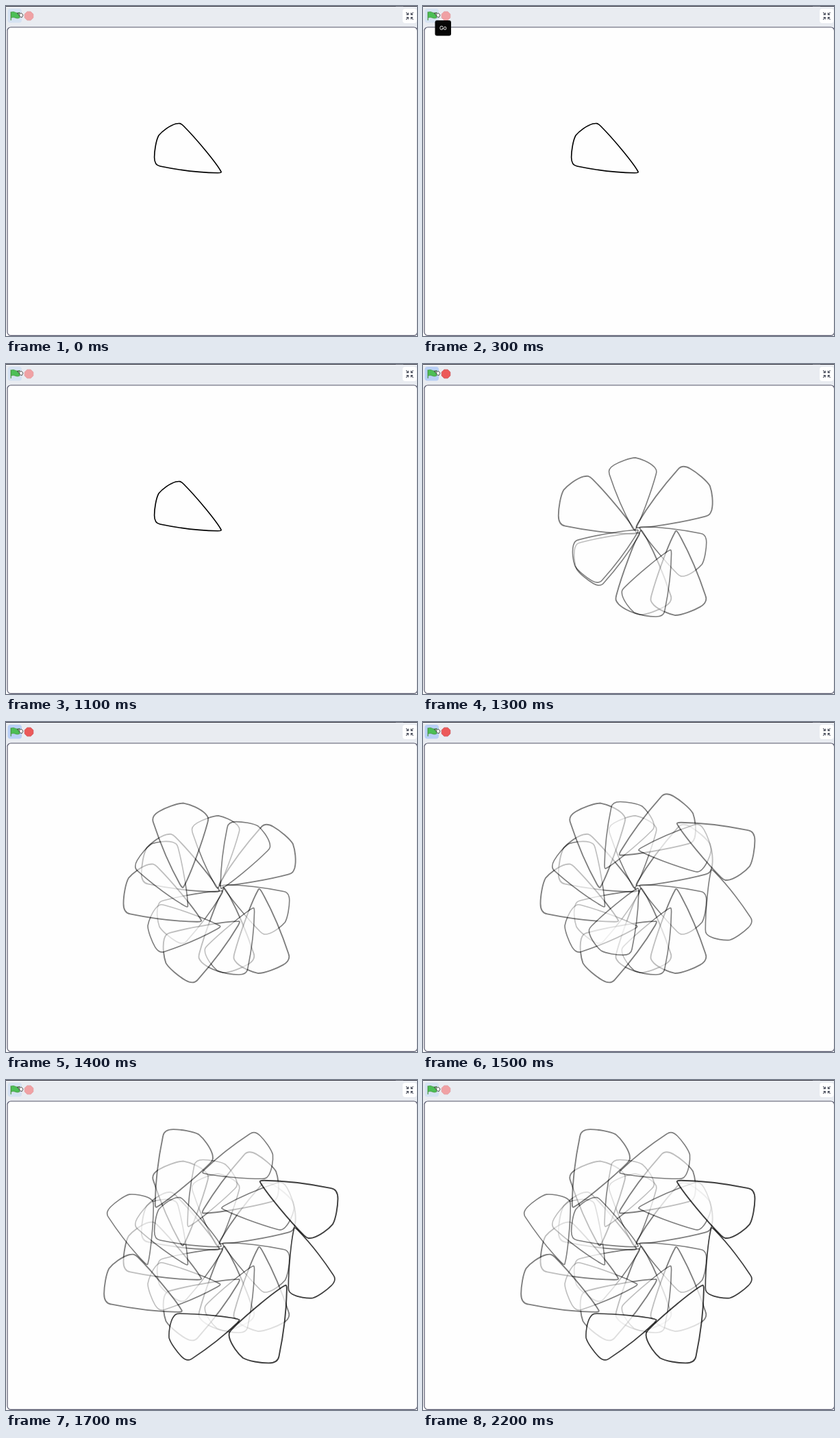
Write an HTML page that moves like this. It is 600x482 px and loops after 2.7 s.

```html
<!DOCTYPE html>
<html lang="en">
<head>
<meta charset="utf-8">
<title>Petal spiral</title>
<style>
  html, body { margin: 0; width: 100%; height: 100%; overflow: hidden; background: #fdfdfe; }
  svg { display: block; width: 100%; height: 100%; }
  text { font: 500 8px Inter, "Liberation Sans", sans-serif; }
</style>
</head>
<body>
<svg viewBox="0 0 600 482">
  <defs>
    <path id="petal" fill="#fefefe" stroke="#000" stroke-width="1.6" stroke-linejoin="round"
      d="M-.5-2C-8-15-36-49-55-68C-59-72-61-72-66-71C-75-68.5-86-60-91-54C-95-47-97.4-31-97.4-22C-97.4-15-95-10-89-9C-60-3-30 .5-5 .8C0 .8 1 0-.5-2Z"/>
    <path id="arrow" d="M-2-4.8V-2H-4.8M-2-2L-5.2-5.2" fill="none" stroke="#474b59" stroke-width="1.1"/>
  </defs>

  <rect width="600" height="36" fill="#e9ecf1"/>
  <rect width="600" height="1" fill="#33333f"/>
  <rect x="569" width="11" height="1" fill="#555762"/>
  <rect x="2" y="31" width="598.5" height="450.3" rx="5" fill="#fefefe" stroke="#55566b" stroke-width="1.2"/>

  <g id="stamps"></g>
  <use id="sprite" href="#petal"/>

  <rect id="button" x="2.5" y="4" width="20.5" height="20.5" rx="4"/>
  <path d="M7.5 9.2C10.5 7.6 12.5 9 14.5 9.8C16.5 10.5 18.5 10 20 9.4V17C17.5 18.4 15.5 18 13.5 17.2C11.5 16.4 9.5 16.4 7.5 17.3Z"
    fill="#4cbf56" stroke="#45993d" stroke-width=".8"/>
  <path d="M7.2 8.8V20.5" stroke="#45993d" stroke-width="1.2" stroke-linecap="round"/>
  <path id="stop" d="M30.9 8.2H36.1L39.8 11.9V17.1L36.1 20.8H30.9L27.2 17.1V11.9Z" stroke-width=".8" stroke-linejoin="round"/>
  <path d="M16.8 10.2L20.4 11.2L22.8 10.6L24.9 13.2L23.3 16.6L20.9 15.8L19.2 14.3L20.3 13.2L17 11.6Z"
    fill="#fff" stroke="#222" stroke-width=".8" stroke-linejoin="round"/>

  <rect x="579" y="4" width="20.5" height="21" rx="4" fill="#fff"/>
  <g transform="translate(589.3 14.6)">
    <use href="#arrow"/>
    <use href="#arrow" transform="rotate(90)"/>
    <use href="#arrow" transform="rotate(180)"/>
    <use href="#arrow" transform="rotate(270)"/>
  </g>

  <g id="tip">
    <rect x="17.5" y="21" width="23.5" height="22.5" rx="3" fill="#060606"/>
    <text x="29.3" y="35" text-anchor="middle" fill="#f2f2f2">Go</text>
  </g>
</svg>
<script>
const LOOP = 2700, START = 1300, END = 1700;
const CENTER = [313.8, 242.8], GHOST = 0.5, BIG = 1.165;
const $ = id => document.getElementById(id);

// Three rings: each stamp turns by a fixed step around the centre.
const rings = [
  { radius: 5, from: 240, step: 60, count: 6 },
  { radius: 56, from: 240, step: 30, count: 10 },
  { radius: 111, from: 180, step: 45, count: 12 }
];
const headings = [];
const stamps = [];

function place(x, y, turn, size) {
  return `translate(${x} ${y}) rotate(${turn}) scale(${size})`;
}

for (const { radius, from, step, count } of rings) {
  for (let i = 0; i < count; i++) {
    const turn = from + i * step;
    const a = (turn + 121) * Math.PI / 180;
    const size = stamps.length % 2 ? 1 : BIG;
    const el = document.createElementNS("http://www.w3.org/2000/svg", "use");
    el.setAttribute("href", "#petal");
    el.setAttribute("opacity", GHOST);
    el.setAttribute("transform", place(
      CENTER[0] + radius * Math.cos(a), CENTER[1] + radius * Math.sin(a), turn, size));
    $("stamps").append(el);
    stamps.push(el);
    headings.push(turn);
  }
}
headings.push(0);

// Number of stamps on the stage after each 100 ms tick.
const progress = [8, 13, 18, 26, 28];

function render(t) {
  const started = t >= START, running = started && t < END;
  const tick = Math.min(Math.floor((t - START) / 100), progress.length - 1);
  const shown = started ? progress[tick] : 0;

  stamps.forEach((el, i) => el.setAttribute("visibility", i < shown ? "visible" : "hidden"));
  $("sprite").setAttribute("transform", place(314, 243, started ? headings[shown] : 0, 1));
  $("sprite").setAttribute("opacity", started ? GHOST : 1);

  $("button").setAttribute("fill", running ? "#b9d0f6" : "#d5e2f2");
  $("stop").setAttribute("fill", running ? "#ec5959" : "#f0a1a4");
  $("stop").setAttribute("stroke", running ? "#cf4f52" : "#e2989c");
  $("tip").setAttribute("opacity", t < 200 || t >= 1100 ? 0 : t < 300 ? 0.6 : 1);
}

let origin;
function frame(now) {
  origin ??= now;
  render((now - origin) % LOOP);
  requestAnimationFrame(frame);
}
render(0);
requestAnimationFrame(frame);
</script>
</body>
</html>
```
